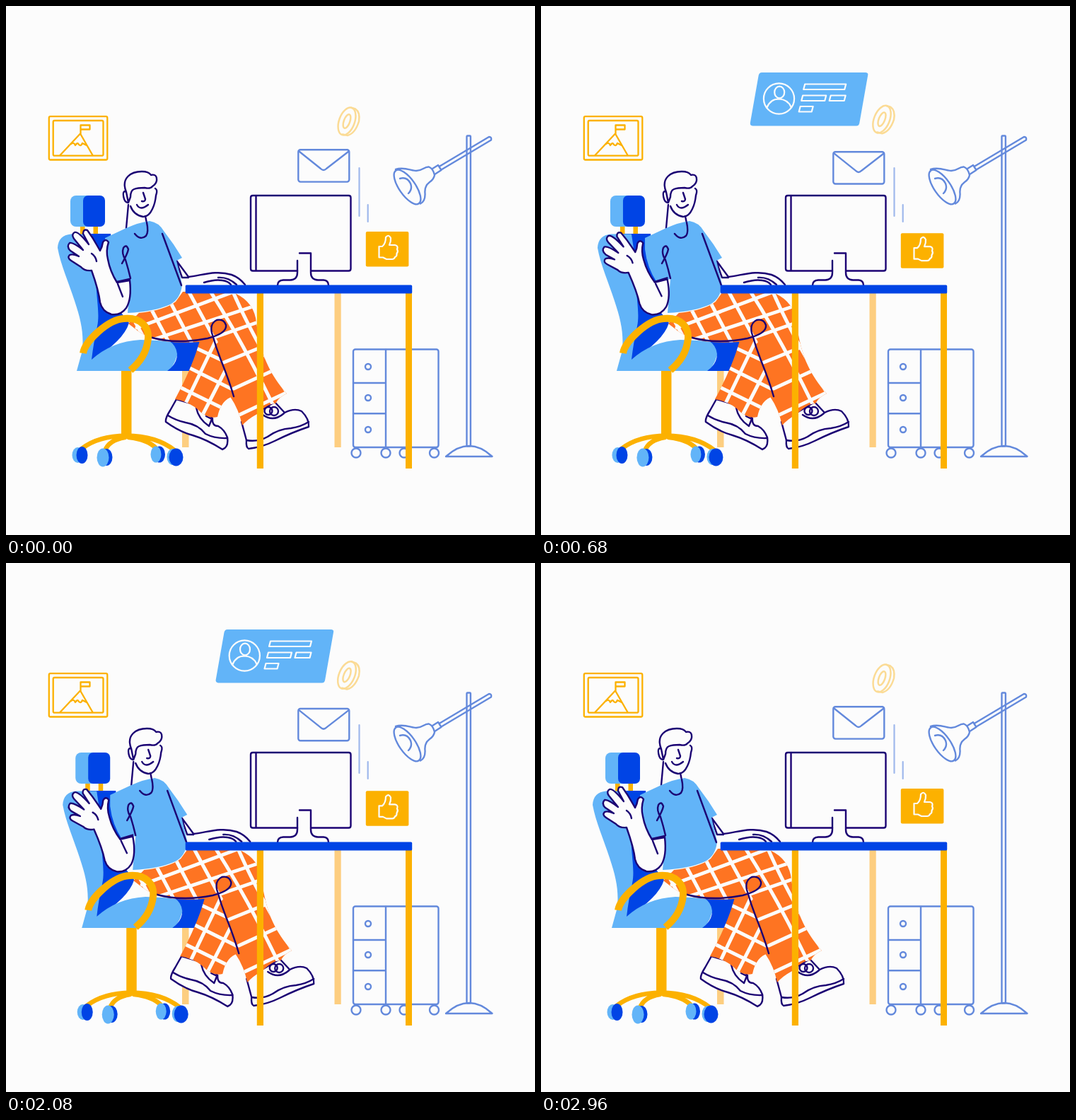
Recreate the animation shown at these times as an HTML page. Size 748 px wide and 748 px high, loop 3 s.

```html
<!DOCTYPE html>
<html lang="en">
<head>
<meta charset="utf-8">
<title>At the desk</title>
<style>
  html, body { margin: 0; width: 100%; height: 100%; overflow: hidden; background: #fcfcfc; }
  svg { display: block; width: 100%; height: 100%; }
  .line { fill: none; stroke-linecap: round; stroke-linejoin: round; }
  .ink { stroke: #1b0273; stroke-width: 2.4; }
  .soft { stroke: #6389dc; stroke-width: 2.4; }
  .gold { stroke: #fcb100; stroke-width: 2.3; }
  .white { stroke: #fcfcfc; stroke-width: 2.2; }
  .paper { fill: #fcfcfc; }
  .blue { fill: #0044e5; }
  .sky { fill: #62b4f8; }
  .yellow { fill: #fcb100; }
  .pale { fill: #fdce80; }
  .orange { fill: #fe7422; }
</style>
</head>
<body>
<svg viewBox="0 0 748 748">
  <defs>
    <path id="legShape" d="M173 449L188 434Q225 430 240 418L250 404H318Q347 414 353 441C360 490 369 516 397 548Q387 552 381 562Q370 562 355 577Q342 584 334 593Q329 570 318 554L285 474Q235 479 206 470Q190 463 182 456Z"/>
    <path id="shinShape" d="M274 473L291 466L322 552Q304 556 299 581Q288 584 276 575Q262 560 239 556Q264 510 274 473Z"/>
    <clipPath id="legClip"><use href="#legShape"/></clipPath>
    <clipPath id="shinClip"><use href="#shinShape"/></clipPath>
  </defs>

  <!-- wall picture -->
  <g class="line gold">
    <rect x="60.800" y="156.200" width="82.500" height="61.300" rx="2"/>
    <rect x="66.700" y="162" width="70.800" height="49.700" rx="2"/>
    <path d="M76.500 211L105 180.500L122.500 211M92 195Q96 192 98 197Q101 192 103 196Q106 199 108 194L114 197M105.500 181V168.500H118.500V174.500H106"/>
  </g>

  <!-- cabinet and lamp -->
  <g class="line soft">
    <rect x="491" y="485.500" width="120.500" height="138.500" rx="3"/>
    <path d="M537 486V624M491 533H537M491 576.300H537"/>
    <g id="knobs"></g>
    <rect x="651.500" y="183.500" width="5.400" height="439" rx="1"/>
    <path d="M622 637Q655 607 687.500 637Z"/>
    <path d="M603 230L611 225L615.500 232L607 237.500M612.500 227L683 185Q687 185 686 189.500L615.500 231.500"/>
    <path d="M551 231C563 227 573 233 580 233C589 233 591 227 598 227.500Q604 230 606 239Q605 245 599 249C592 254 592 260 592.500 265Q593 276 586 279.500"/>
    <ellipse cx="567.500" cy="256" rx="28.500" ry="11.500" transform="rotate(55 567.500 256)"/>
    <path d="M557 244Q567 241 572 251Q575 259 569 265"/>
  </g>

  <path class="pale" d="M249 480H258.500V624H249ZM464.500 406H473.700V624H464.500Z"/>

  <g id="card">
    <path class="sky" d="M313 94H460Q464 94.500 463 98L451 166Q450 169.500 447 169.500H300Q296 169 296.700 165L308.500 98Q309.500 94 313 94Z"/>
    <g class="line white">
      <circle cx="337.300" cy="131" r="21.600"/>
      <ellipse cx="338" cy="122" rx="7" ry="8.300"/>
      <path d="M320 144Q325 131.500 337 131.500Q350 132 354.500 143"/>
      <g id="bars"></g>
    </g>
  </g>

  <g id="coin" class="line" stroke="#fbdb95" stroke-width="2.500">
    <ellipse cx="482" cy="163" rx="11" ry="20.300" transform="rotate(20 482 163)"/>
    <ellipse cx="482" cy="163" rx="4.300" ry="10.300" transform="rotate(20 482 163)"/>
    <path d="M488 143.700L494 145.500Q501 150 499 163Q494 180 483 183L476 181.500"/>
  </g>

  <g id="mail" class="line soft">
    <rect x="413.300" y="203.300" width="72" height="45.300" rx="3"/>
    <path d="M415 206L445 230Q449 234 453 230L484 206"/>
  </g>
  <path class="line" stroke="#9fb8ec" stroke-width="2.200" d="M499.500 229V297M511.700 281V305"/>

  <g id="like">
    <rect class="yellow" x="508.800" y="319" width="60.600" height="49.500" rx="2"/>
    <path class="line white" d="M527.500 340H532Q537 336 537 327Q541 322 544 328Q544.500 333 542 338H550Q555 339 553 344Q555 347 552.500 350Q553 354 550 355Q549 358 546 358H538L533 355.500H527.500Z"/>
  </g>

  <!-- monitor -->
  <g class="line ink">
    <path d="M412 374.500H349Q346 374.500 346 371.500V271Q346 268 349 268H484.500Q487.500 268 487.500 271V371.500Q487.500 374.500 484.500 374.500H432M353.500 268V374.500"/>
    <path d="M415 349.500H431V377Q431 387 441 387.500H449Q456 388 456 395M412 360V377Q412 387 402 387.500H392Q384 388 384 395"/>
  </g>

  <g id="sitter">
    <!-- chair base -->
    <path class="yellow" d="M163 514H177.500V610H163Z"/>
    <g class="line" stroke="#fcb100" stroke-width="6.500">
      <path d="M107 626Q130 608 170 607.500Q213 608 238 628M140 629Q145 614 168 610M212 625Q200 613 174 610"/>
    </g>
    <g id="wheels"></g>

    <!-- chair -->
    <path class="yellow" d="M105 310H111.500V324H105ZM123.500 310H130V324H123.500Z"/>
    <rect class="sky" x="91" y="268" width="34" height="44" rx="8"/>
    <rect class="blue" x="109" y="268" width="31" height="44" rx="7"/>
    <path class="blue" d="M110 322H148L160 430L174 448Q166 474 121 501Z"/>
    <path class="sky" d="M92 322.500H121Q125 350 129 375C124 400 134 430 129 453Q124 475 121 500Q150 474 190 472L236 474Q245 482 242 494Q238 508 230 516H100L108 487C110 462 106 444 97 417C89 392 77 365 73 342Q74 324 92 322.500Z"/>
    <path class="blue" d="M230 473L274.500 473Q270 498 261 516H228Q242 506 242 492Q241 480 230 473Z"/>

    <!-- shoes -->
    <g class="line ink">
      <path class="paper" d="M241 556L232 572Q225 583 226 588Q245 602 264 607Q284 613 306 627Q315 624 313 610Q309 599 300 594Q291 594 292 583L275 566Z"/>
      <path d="M229 579Q240 586 254 589Q272 592 282 605Q296 612 313 611M269 568Q272 584 287 594L291 584L283 580"/>
      <path class="paper" d="M333 588L340 614Q339 624 343 626Q362 624 380 615Q404 603 428 595Q429 584 418 573Q408 568 394 575L380 560Z"/>
      <path d="M340 614Q356 617 370 609Q385 598 403 597Q417 595 428 588M363 578Q378 589 393 576"/>
      <circle cx="371" cy="572.500" r="5.500"/><circle cx="379" cy="573" r="6"/>
    </g>

    <!-- plaid trousers -->
    <use href="#legShape" class="orange"/>
    <path class="line" clip-path="url(#legClip)" stroke="#fcfcfc" stroke-width="5" d="M178 438L198 475M205 428L230 475M232 418L262 475M258 403L297 475M288 402Q332 470 378 565M320 402Q347 465 398 548M185 455L325 403M210 471L352 424M285 472L362 445M308 504L372 478M322 541L385 512M328 579L400 545"/>
    <use href="#shinShape" class="orange"/>
    <path class="line" clip-path="url(#shinClip)" stroke="#fcfcfc" stroke-width="5" d="M265 482L312 504M256 510L326 545M244 538L305 568M301 464L252 566M316 504L276 582"/>
    <path class="line ink" d="M203 468Q240 479 285 470Q313 463 311 451Q308 442 298 444Q288 449 291 462Q297 483 304 501Q315 528 322 552"/>

    <!-- far arm -->
    <path class="paper" d="M236 355L243 360L258 383Q288 376 308 377Q328 380 338 395H248Z"/>
    <path class="line ink" d="M241 360L258 383C277 381 297 373 319 380Q330 384 338 394M241 361L249 384H258M280 391Q296 386 306 388Q314 389 318 394M300 384Q314 383 326 394"/>

    <!-- head -->
    <path class="paper" d="M173 276L170 318H202L197 297L210 286L212 250L171 250Z"/>
    <g class="line ink">
      <path d="M173 281L170 314M197 297L199 307M211 258Q215 260 212 268Q211 279 207 287Q202 298 194 298Q181 296 176 283"/>
      <path class="paper" d="M172 278C166 277 164 263 168 262Q171 262 172 266"/>
      <path class="paper" d="M170 263C162 243 177 234 192 234Q202 234 205 239Q214 237 213 247Q212 252 207 255Q204 259 196 257Q186 257 181 259Q176 261 176 270L173 278Z"/>
      <path d="M194 264L197 273Q197 277 192 276M185 281Q190 290 201 281"/>
    </g>

    <!-- shirt -->
    <path class="sky" d="M140 328L170 314Q188 306 203 304Q216 306 223 318Q237 336 249 356L241 360Q246 380 249 394Q247 414 232 422Q210 432 172 434L176 386L157 391Q143 370 140 344Z"/>
    <path class="line ink" d="M199 306Q202 320 198 325Q190 332 182 322M221 322L248 395M164 364Q172 350 173 344Q170 336 166 342Q163 350 169 359Q173 372 176 385"/>

    <!-- waving arm -->
    <g id="arm" class="line ink">
      <path class="paper" d="M175 388Q178 414 170 427Q162 438 149 436Q136 432 133 419C131 402 126 388 121 374Q111 375 106 369L92 360Q86 356 90 352Q95 350 103 354L91 346Q85 340 90 335Q95 334 109 345L96 329Q92 323 97 320Q102 318 117 337L109 322Q109 315 115 317Q123 328 129 339L133 346Q136 341 137 334Q141 328 145 334Q141 346 144 358Q147 375 157 391Z"/>
      <path d="M157 390L175 386M165 411L158 393M121 350Q127 354 128 361"/>
    </g>

    <path class="line" style="stroke-linecap:butt" stroke="#fcb100" stroke-width="10" d="M109 491C112 473 145 443 167 442C192 440 202 455 201 470C199 490 190 503 176 515"/>
  </g>

  <!-- desk -->
  <path class="yellow" d="M354.800 405H364V654H354.800ZM565 405H574V654H565Z"/>
  <rect class="blue" x="253.700" y="394.500" width="320.500" height="12" rx="1.500"/>
</svg>
<script>
  const LOOP = 3000, STEP = 40;
  const $ = id => document.getElementById(id);
  const clamp = v => Math.min(1, Math.max(0, v));
  const span = (t, from, to) => clamp((t - from) / (to - from));
  const smooth = u => u * u * (3 - 2 * u);
  const wave = (t, period) => (1 - Math.cos(2 * Math.PI * t / period)) / 2;
  const shift = (id, x, y, extra = '') => $(id).setAttribute('transform', `translate(${x} ${y}) ${extra}`);

  const circle = (x, y, r) => `<circle cx="${x}" cy="${y}" r="${r}"/>`;
  $('knobs').innerHTML =
    [510, 554, 599].map(y => circle(512, y, 4)).join('') +
    [495, 537, 563, 605.5].map(x => circle(x, 632, 6.5)).join('');

  const bar = ([x, y, w]) => `<path d="M${x + 2} ${y}h${w}l-2 7.500h-${w}Z"/>`;
  $('bars').innerHTML = [[372, 110.5, 58], [369, 126.5, 33], [408.5, 126.5, 21], [365.5, 142, 18]].map(bar).join('');

  const oval = (color, x, y, rx, ry) => `<ellipse class="${color}" cx="${x}" cy="${y}" rx="${rx}" ry="${ry}"/>`;
  $('wheels').innerHTML =
    oval('sky', 101.5, 635, 8, 11) + oval('blue', 107.5, 635, 8, 12) +
    oval('blue', 142, 638, 8.5, 12) + oval('sky', 137, 638.5, 8.5, 13) +
    oval('blue', 217, 634, 8, 11.5) + oval('sky', 212, 634, 7.5, 11.5) +
    oval('sky', 236, 637.5, 8.5, 11.5) + oval('blue', 240.5, 638, 10, 12.5);

  function draw(t) {
    const glide = Math.sin(span(t, 0, 900) * Math.PI / 2) - smooth(span(t, 2000, 2700));
    shift('sitter', 7.5 * glide, 0);
    $('arm').setAttribute('transform', `rotate(${-4.8 * wave(t, 1500)} 154 428)`);

    const slow = wave(t, LOOP);
    shift('mail', 0, 3 * wave(t, 1500));
    shift('like', 0, 5 * slow);
    shift('coin', 0, -6.5 * slow, `rotate(${4 * slow} 484 163)`);

    shift('card', -36 * (1 - span(t, 0, 800)) ** 2, 0);
    $('card').setAttribute('opacity', span(t, 0, 480) - span(t, 2400, 2800));
  }

  const start = performance.now();
  function tick() {
    const t = (performance.now() - start) % LOOP;
    draw(Math.floor(t / STEP) * STEP);
    requestAnimationFrame(tick);
  }
  draw(0);
  requestAnimationFrame(tick);
</script>
</body>
</html>
```
